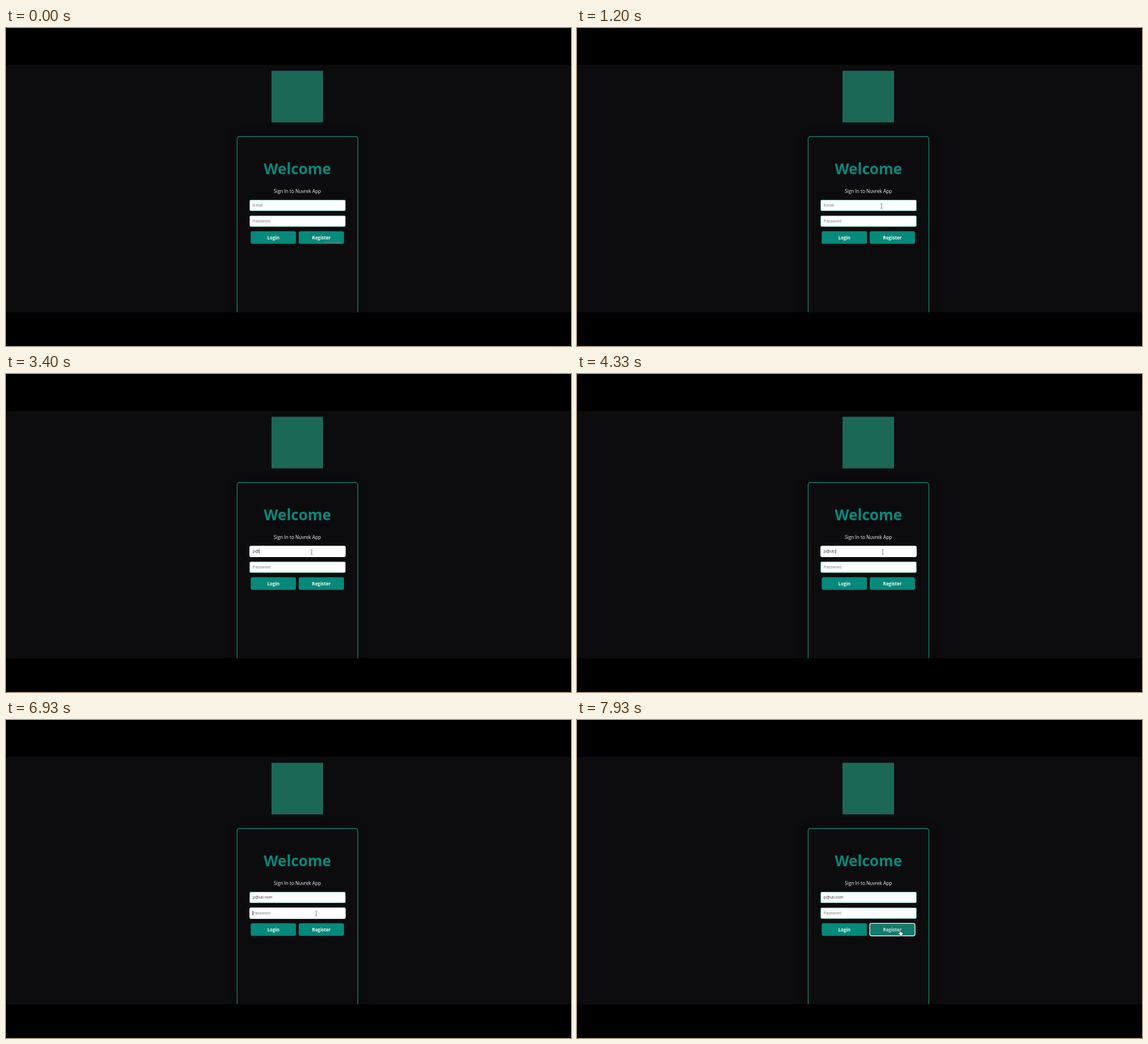
An HTML page that plays this animation: 998 px wide and 561 px high, repeating every 8 s.

```html
<!DOCTYPE html>
<html lang="en">
<head>
<meta charset="utf-8">
<title>Sign in</title>
<style>
  html, body { margin: 0; height: 100%; overflow: hidden; background: #000; }
  svg { display: block; width: 100vw; height: 100vh; }
  .ui { font-family: "Open Sans", "Noto Sans", sans-serif; text-anchor: middle; }
  .in { font: 7.1px "Liberation Sans", Arial, sans-serif; }
  .field { fill: #fff; stroke: #5fab9b; }
  .field.on { stroke: #fff; }
  .btn { fill: #04897a; }
  .btn.hover { fill: #137a6b; }
  .label { font-size: 8px; font-weight: 700; fill: #f4f8f7; }
  #beam { mix-blend-mode: difference; }
</style>
</head>
<body>
<svg viewBox="0 0 998 561">
  <defs>
    <clipPath id="page"><rect y="65" width="998" height="436.5"/></clipPath>
    <filter id="blur" x="-20%" y="-20%" width="140%" height="140%"><feGaussianBlur stdDeviation="9"/></filter>
  </defs>
  <rect width="998" height="561"/>
  <g clip-path="url(#page)">
    <rect y="65" width="998" height="437" fill="#0c0c0e"/>
    <rect x="469" y="75.5" width="91" height="91" fill="#1b6857"/>
    <rect x="408" y="191" width="214" height="340" rx="4" opacity=".55" filter="url(#blur)"/>
    <rect x="408.3" y="191.5" width="213.2" height="340" rx="4" fill="#0c0c0e" stroke="#167f6e" stroke-width="1.4"/>
  </g>
  <g class="ui">
    <text x="514.7" y="258" font-size="26.2" font-weight="700" fill="#06887a">Welcome</text>
    <text x="514.7" y="291.2" font-size="8.3" fill="#f6f6f6">Sign In to Nuvrek App</text>
  </g>
  <rect id="email" class="field" x="430.5" y="303.5" width="169" height="19" rx="2"/>
  <rect id="pass" class="field" x="430.5" y="331.3" width="169" height="19" rx="2"/>
  <text id="mail" class="in" x="435.8" y="315.3"></text>
  <text class="in" x="435.8" y="343.2" fill="#808080">Password</text>
  <rect id="caret" width=".8" height="8.2" fill="#222"/>
  <rect id="login" class="btn" x="432.2" y="358.6" width="80" height="22.2" rx="3"/>
  <rect id="register" class="btn" x="517" y="358.6" width="80" height="22.2" rx="3"/>
  <rect id="ring" x="517.2" y="358.6" width="79.8" height="22.2" rx="3" fill="none" stroke="#eef2f1" stroke-width="1.4"/>
  <rect id="bar" x="562" y="377.7" width="30" height="1.8" rx=".9" fill="#4c8577"/>
  <g class="ui label">
    <text x="472.3" y="373.2">Login</text>
    <text id="regText" x="557" y="373.2">Register</text>
  </g>
  <path id="arrow" d="M0 0V9.2L2.1 7.3 3.5 10.5 5 9.9 3.6 6.8H6.5Z" fill="#fff" stroke="#000" stroke-width=".5"/>
  <path id="beam" d="M-1.6-4H-.4L0-3.6.4-4H1.6M0-3.6V3.8M-1.6 4.2H-.4L0 3.8.4 4.2H1.6" fill="none" stroke="#aaa" stroke-width=".8"/>
  <path id="hand" d="M-.8 0Q0-.9.8 0V3.2L4.2 4Q5 4.3 4.9 5.4L4.3 7.6V9.6H-.2V8.4L-2.6 5.4Q-2.6 4.3-1.6 4.6L-.8 5.3Z" fill="#fff" stroke="#222" stroke-width=".5"/>
</svg>
<script>
const $ = id => document.getElementById(id);
const LOOP = 8000, STEP = 1000 / 15, BLINK = 535;
const ADDRESS = "p@ub.nom";
const keys = [1920, 2300, 3590, 3790, 4130, 4590, 4660, 4799];
const EMAIL_CLICK = 1250, PASS_CLICK = 6850, REGISTER_CLICK = 7920;

// time, x, y of the pointer's hot spot
const path = [
  [66, 867, 431], [270, 690, 322], [400, 560, 268], [530, 470, 249],
  [600, 436, 262], [700, 455, 296], [800, 510, 318], [866, 535, 323.5],
  [933, 536, 324], [1066, 536, 324], [1200, 538, 314], [1266, 540, 314],
  [6333, 540, 314], [6400, 541.5, 318], [6600, 546, 334], [6733, 548, 341],
  [7066, 548, 341], [7266, 550, 343], [7533, 556.3, 352], [7667, 562, 362],
  [7866, 570.5, 371]
];

function pointerAt(t) {
  const i = path.findIndex(p => p[0] > t);
  if (i < 0) return path[path.length - 1].slice(1);
  const [t0, x0, y0] = path[Math.max(i - 1, 0)], [t1, x1, y1] = path[i];
  const k = i ? (t - t0) / (t1 - t0) : 0;
  return [x0 + (x1 - x0) * k, y0 + (y1 - y0) * k];
}

const within = (v, a, b) => v >= a && v <= b;
const show = (id, on) => $(id).style.display = on ? "" : "none";

function drawPointer(t) {
  const [x, y] = pointerAt(t);
  const onField = within(x, 430, 600) && (within(y, 303, 323) || within(y, 331, 352.5));
  const onRow = within(y, 358, 381);
  const onLogin = onRow && within(x, 432, 512), onRegister = onRow && within(x, 517, 597);
  const kind = onField ? "beam" : onLogin || onRegister ? "hand" : "arrow";
  for (const id of ["arrow", "beam", "hand"]) {
    show(id, id === kind && t > 60);
    $(id).setAttribute("transform", `translate(${x} ${y})`);
  }
  $("login").classList.toggle("hover", onLogin);
  $("register").classList.toggle("hover", onRegister);
  $("regText").setAttribute("fill", onRegister ? "#cfdedb" : "#f4f8f7");
}

function drawForm(t) {
  const typed = keys.filter(k => k <= t).length;
  const onEmail = within(t, EMAIL_CLICK, PASS_CLICK);
  const onPass = within(t, PASS_CLICK, REGISTER_CLICK);
  $("email").classList.toggle("on", onEmail);
  $("pass").classList.toggle("on", onPass);

  const mail = $("mail");
  mail.textContent = typed ? ADDRESS.slice(0, typed) : "Email";
  mail.setAttribute("fill", typed ? "#444" : "#808080");

  const since = t - (onPass ? PASS_CLICK : typed ? keys[typed - 1] : EMAIL_CLICK);
  show("caret", (onEmail || onPass) && Math.floor(since / BLINK) % 2 === 0);
  const offset = onEmail && typed ? mail.getComputedTextLength() : 0;
  $("caret").setAttribute("x", 435.6 + offset);
  $("caret").setAttribute("y", onPass ? 336.7 : 308.8);

  show("ring", t >= REGISTER_CLICK);
  show("bar", t < 60);
}

function frame(now) {
  const t = Math.floor((now % LOOP + 4) / STEP) * STEP % LOOP;
  drawForm(t);
  drawPointer(t);
  requestAnimationFrame(frame);
}
frame(0);
</script>
</body>
</html>
```
